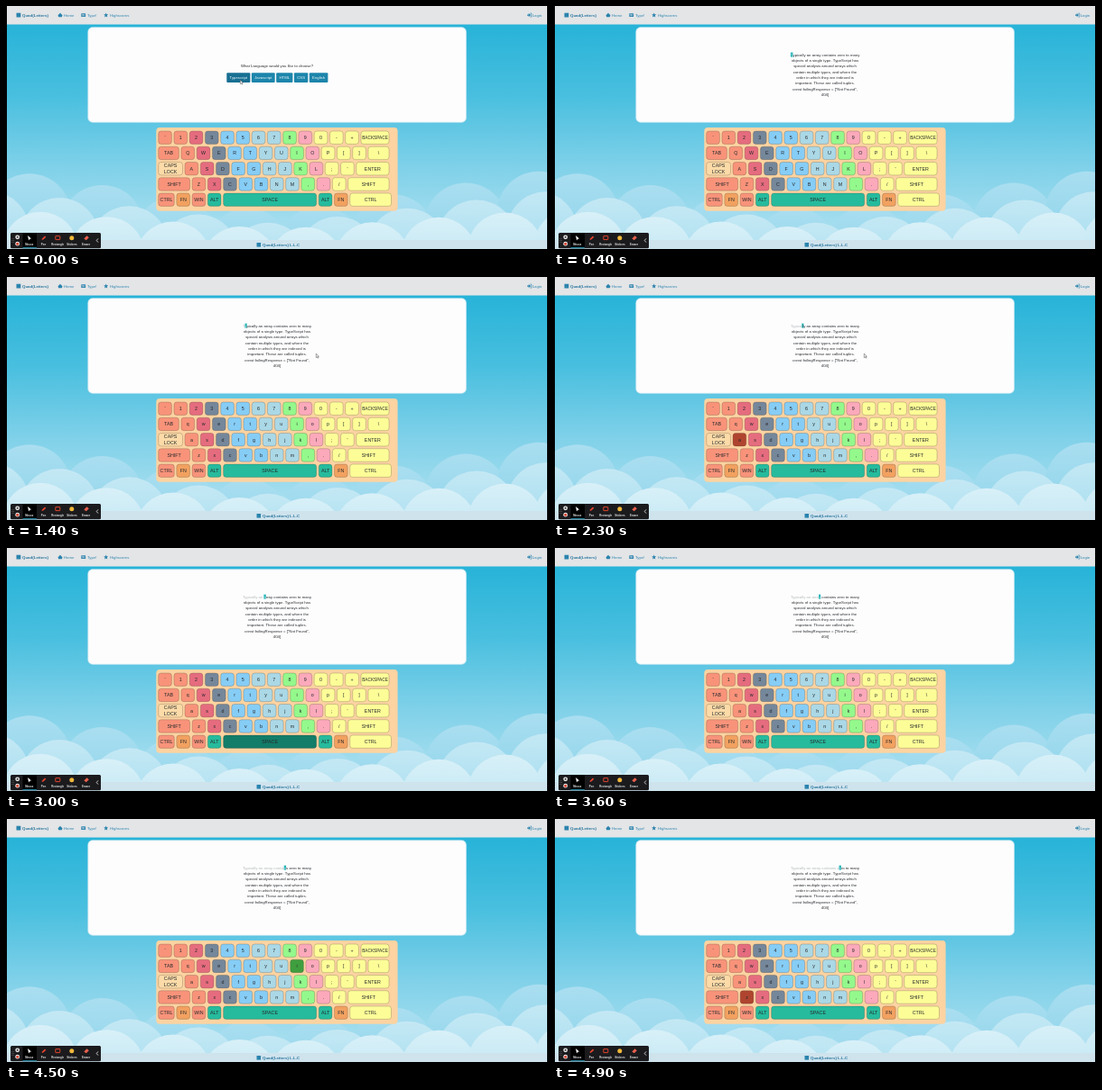
Write an HTML page with a canvas that moves like this. It is 600x270 px and loops after 5 s.

```html
<!DOCTYPE html>
<html lang="en">
<head>
<meta charset="utf-8">
<title>Typing trainer</title>
<style>
html, body { margin: 0; width: 600px; height: 270px; overflow: hidden; }
canvas { display: block; }
</style>
</head>
<body>
<canvas id="stage" width="600" height="270"></canvas>
<script>
const ctx = document.getElementById('stage').getContext('2d');
const LOOP = 5000, STEP = 100, HOLD = 90;
const CHOSEN = 200, LOWER = 1300, MOUSE_OFF = 2600;
const SANS = '"Liberation Sans", Arial, sans-serif';
const BRAND = 'Quad(Letters)';
const INK = '#25282b', BLUE = '#2b83ad', BAR = '#e3e5e7';

const LINES = [
  'Typically an array contains zero to many',
  'objects of a single type. TypeScript has',
  'special analysis around arrays which',
  'contain multiple types, and where the',
  'order in which they are indexed is',
  'important. These are called tuples.',
  'const failingResponse = ["Not Found",',
  '404]'
];

// typing pace: letters typed by a time, steady in between
const PACE = [[1, 1230], [6, 2300], [13, 3000], [21, 4020], [22, 4100], [29, 4900]];

function pressTime(n) {
  const k = Math.max(1, PACE.findIndex(([count]) => count >= n));
  const [n0, t0] = PACE[k - 1], [n1, t1] = PACE[k];
  return t0 + (t1 - t0) * (n - n0) / (n1 - n0);
}
const PRESSES = Array.from({ length: 29 }, (_, i) => pressTime(i + 1));

// key colour: idle, pressed
const COLORS = {
  s: ['#f8937a', '#b0452f'],
  c: ['#e56c7e', '#a03048'],
  g: ['#75879a', '#3d4a57'],
  k: ['#86cdf6', '#2f7fae'],
  b: ['#abd8e6', '#2c7c98'],
  n: ['#94f98c', '#3f9f3f'],
  p: ['#fba9bb', '#a8485a'],
  y: ['#fdfd98', '#b0b040'],
  t: ['#26bb9d', '#127d69'],
  f: ['#f2a160', '#a8602c'],
  o: ['#fcdba8', '#b08850']
};

const WIDE = { TAB: 22.7, CAPS: 26.8, CTRL: 17.6, SPACE: 103.1, SHIFT: 34.9 };

const ROWS = [
  ['` 1 2 3 4 5 6 7 8 9 0 - + BACKSPACE', 'sscgkkbbnpyyyy'],
  ['TAB Q W E R T Y U I O P [ ] \\', 'sscgkkbbnpyyyy'],
  ["CAPS A S D F G H J K L ; ' ENTER", 'oscgkkbbnpyyy'],
  ['SHIFT Z X C V B N M , . / SHIFT', 'sscgkkbbnpyy'],
  ['CTRL FN WIN ALT SPACE ALT FN CTRL', 'sfstttfy']
];

function layKeys() {
  const keys = [];
  ROWS.forEach(([labels, colors], row) => {
    const names = labels.split(' ');
    const end = row === 4 ? 426.5 : 424;
    let x = 168.7;
    names.forEach((name, i) => {
      const w = i === names.length - 1 ? end - x : WIDE[name] || 14.7;
      keys.push({ name, x, y: 139 + row * 17.25, w, h: 14.4, color: COLORS[colors[i]] });
      x += w + 2.55;
    });
  });
  return keys;
}
const KEYS = layKeys();

function box(x, y, w, h, r, fill, line, width = 0.6) {
  ctx.beginPath();
  ctx.roundRect(x, y, w, h, r);
  if (fill) { ctx.fillStyle = fill; ctx.fill(); }
  if (line) { ctx.strokeStyle = line; ctx.lineWidth = width; ctx.stroke(); }
}

function disc(x, y, r, fill) {
  ctx.beginPath();
  ctx.arc(x, y, r, 0, Math.PI * 2);
  ctx.fillStyle = fill;
  ctx.fill();
}

function poly(points, fill, line, width = 0.5) {
  ctx.beginPath();
  points.forEach(([x, y]) => ctx.lineTo(x, y));
  if (fill) { ctx.closePath(); ctx.fillStyle = fill; ctx.fill(); }
  if (line) { ctx.strokeStyle = line; ctx.lineWidth = width; ctx.stroke(); }
}

function fade(y0, y1, ...stops) {
  const g = ctx.createLinearGradient(0, y0, 0, y1);
  stops.forEach((c, i) => g.addColorStop(i / (stops.length - 1), c));
  return g;
}

// set large and scaled down, with a trace of rotation: no hinting of tiny glyphs
const BIG = 64;
function setFont(weight) {
  ctx.font = `${weight} ${BIG}px ${SANS}`;
}
function text(str, x, y, size, color, align = 'center', weight = 'normal') {
  ctx.save();
  ctx.translate(x, y);
  ctx.rotate(0.0005);
  ctx.scale(size / BIG, size / BIG);
  setFont(weight);
  ctx.textAlign = align;
  ctx.fillStyle = color;
  ctx.fillText(str, 0, 0);
  ctx.restore();
}
function widthOf(str, size) {
  setFont('normal');
  return ctx.measureText(str).width * size / BIG;
}

// a row of round clouds, high at both sides and low in the middle
function clouds(shift, top, dip, r, light, deep) {
  for (let x = shift; x < 600 + r; x += r * 1.75) {
    const side = Math.min(1, Math.abs(x / 300 - 1));
    const y = top + dip * (1 - side);
    disc(x, y + r, r, fade(y, y + r * 1.4, light, deep));
  }
}

function sky() {
  ctx.fillStyle = fade(20, 260, '#27b3d8', '#49bfdf', '#80d1e9', '#aee1f0');
  ctx.fillRect(0, 0, 600, 270);
  clouds(26, 182, 48, 46, '#aadef0', '#93d6ec');
  clouds(-18, 206, 36, 44, '#c4e8f4', '#a8def0');
  clouds(38, 226, 22, 42, '#d8f0f8', '#bfe6f3');
}

function navbar() {
  ctx.fillStyle = BAR;
  ctx.fillRect(0, 0, 600, 20.5);
  box(11.5, 7.7, 4.8, 4.8, 0, BLUE);
  text(BRAND, 18, 11.6, 4.4, '#26749c', 'left', 'bold');
  poly([[57.5, 10.2], [60, 7.7], [62.5, 10.2], [61.8, 12.3], [58.2, 12.3]], BLUE);
  text('Home', 64, 11.5, 4.27, BLUE, 'left');
  box(83.3, 8.2, 4.8, 3.8, 0.5, BLUE);
  box(84.4, 10.5, 2.6, 0.6, 0, BAR);
  for (let i = 0; i < 3; i++) box(84.1 + i * 1.2, 9, 0.7, 0.7, 0, BAR);
  text('Type!', 90, 11.5, 4.27, BLUE, 'left');
  const star = Array.from({ length: 10 }, (_, i) => {
    const a = (i / 5 - 0.5) * Math.PI, r = i % 2 ? 1.2 : 2.7;
    return [110.7 + r * Math.cos(a), 10.2 + r * Math.sin(a)];
  });
  poly(star, BLUE);
  text('Highscores', 115, 11.5, 4.27, BLUE, 'left');
  box(577, 9.5, 2, 1.3, 0, BLUE);
  poly([[578.7, 8], [581, 10.1], [578.7, 12.2]], BLUE);
  poly([[580.3, 8], [581.7, 8], [581.7, 12.2], [580.3, 12.2]], null, BLUE, 0.6);
  text('Login', 582.7, 11.5, 4.27, BLUE, 'left');
}

function footer() {
  ctx.fillStyle = '#cfe3ed';
  ctx.fillRect(0, 260, 600, 10);
  box(277.5, 263, 4.6, 4.6, 0, BLUE);
  text(BRAND + ' L.L.C', 284, 266.9, 4.4, '#26749c', 'left', 'bold');
}

function menu() {
  text('What Language would you like to choose?', 300, 68.3, 4.27, INK);
  let x = 244.3;
  ['Typescript', 'Javascript', 'HTML', 'CSS', 'English'].forEach((label, i) => {
    const w = widthOf(label, 4.27) + 6.6;
    box(x, 74.3, w, 10.8, 1, i ? '#1c85ab' : '#176f92');
    text(label, x + w / 2, 81.2, 4.27, '#f4fafc');
    x += w + 1.5;
  });
}

function lesson(count) {
  const size = 4.27, base = 55.6, [first] = LINES;
  const left = 300 - widthOf(first, size) / 2;
  const at = n => left + widthOf(first.slice(0, n), size);
  const x = at(count), next = at(count + 1);
  box(x, 51.6, Math.max(2.2, next - x), 5, 0, '#27b5b8');
  text(first.slice(0, count), left, base, size, '#b4bab9', 'left');
  text(first[count], x, base, size, '#8fdcd8', 'left');
  text(first.slice(count + 1), next, base, size, INK, 'left');
  LINES.slice(1).forEach((line, i) => text(line, 300, base + (i + 1) * 6.37, size, INK));
}

function keyboard(t) {
  const held = new Set();
  PRESSES.forEach((p, i) => {
    if (t >= p && t - p < HOLD) held.add(LINES[0][i].toUpperCase());
  });
  box(166.3, 135, 267.3, 92.8, 4, '#fcd3a1');
  for (const k of KEYS) {
    const down = held.has(k.name === 'SPACE' ? ' ' : k.name);
    box(k.x, k.y, k.w, k.h, 3, k.color[down ? 1 : 0], 'rgba(70,60,50,0.42)');
    const mid = k.x + k.w / 2;
    if (k.name === 'CAPS') {
      text('CAPS', mid, k.y + 5.8, 5.33, INK);
      text('LOCK', mid, k.y + 12.4, 5.33, INK);
      continue;
    }
    const lower = t >= LOWER && k.name.length === 1;
    text(lower ? k.name.toLowerCase() : k.name, mid, k.y + 9.1,
      k.name === 'BACKSPACE' ? 4.75 : 5.33, INK);
  }
}

function toolbar() {
  box(5, 252, 100, 17.2, 1.5, '#1b1b1e');
  box(18.5, 252, 15.5, 17.2, 0, '#000');
  box(18.5, 268.3, 15.5, 0.9, 0, '#2fb4d8');
  for (let i = 0; i < 6; i++) disc(6.8 + i % 2 * 1.4, 258.6 + (i >> 1) * 1.9, 0.4, '#999');
  disc(12.7, 256.8, 2.4, '#e8e8e8');
  disc(12.7, 256.8, 1, '#333');
  disc(12.7, 264.2, 2.4, '#e8e8e8');
  disc(12.7, 264.2, 1.5, '#d9432f');
  poly([[24, 255], [28, 258.4], [26.2, 258.7], [25.2, 260.4]], '#fff');
  poly([[39.6, 260], [40.2, 258.2], [43, 255.4], [44.3, 256.7], [41.4, 259.5]], '#e2452f');
  box(54.8, 255.6, 5, 4, 0.3, null, '#e0452c', 1);
  disc(72.8, 257.7, 2.5, '#f0b73a');
  poly([[86.3, 258.6], [89.5, 255.2], [91.8, 257.2], [88.8, 260.3]], '#e8604e');
  ['Mouse', 'Pen', 'Rectangle', 'Stickers', 'Eraser'].forEach((label, i) => {
    text(label, 25.8 + i * 15.7, 265.8, 2.9, '#e6e6e6', 'center', 'bold');
  });
  poly([[102, 258.4], [100.2, 260.5], [102, 262.6]], null, '#ddd', 0.9);
}

function mouse(t) {
  if (t >= MOUSE_OFF || (t >= CHOSEN && t < 600)) return;
  const p = Math.min(1, Math.max(0, (t - CHOSEN) / 1000)), e = p * p * (3 - 2 * p);
  ctx.save();
  ctx.translate(259.3 + 84 * e, 82.2 + 3 * e);
  poly([[0, 0], [0, 4.4], [1, 3.5], [1.8, 5], [2.5, 4.6], [1.8, 3.2], [3.1, 3.1], [0, 0]],
    '#fff', '#444', 0.5);
  ctx.restore();
}

function edges() {
  ctx.fillStyle = '#000';
  ctx.fillRect(0, 0, 1, 270);
  ctx.fillRect(599, 0, 1, 270);
}

function draw(t) {
  sky();
  navbar();
  footer();
  box(90.8, 23.7, 418.6, 105.5, 5, '#fdfdfe', '#c4e6f1', 0.7);
  if (t < CHOSEN) menu();
  else lesson(PRESSES.filter(p => p <= t).length);
  keyboard(t);
  toolbar();
  mouse(t);
  edges();
}

const start = performance.now();
function tick() {
  const t = Math.max(0, performance.now() - start) % LOOP;
  draw(Math.floor(t / STEP) * STEP);
  requestAnimationFrame(tick);
}
tick();
</script>
</body>
</html>
```
